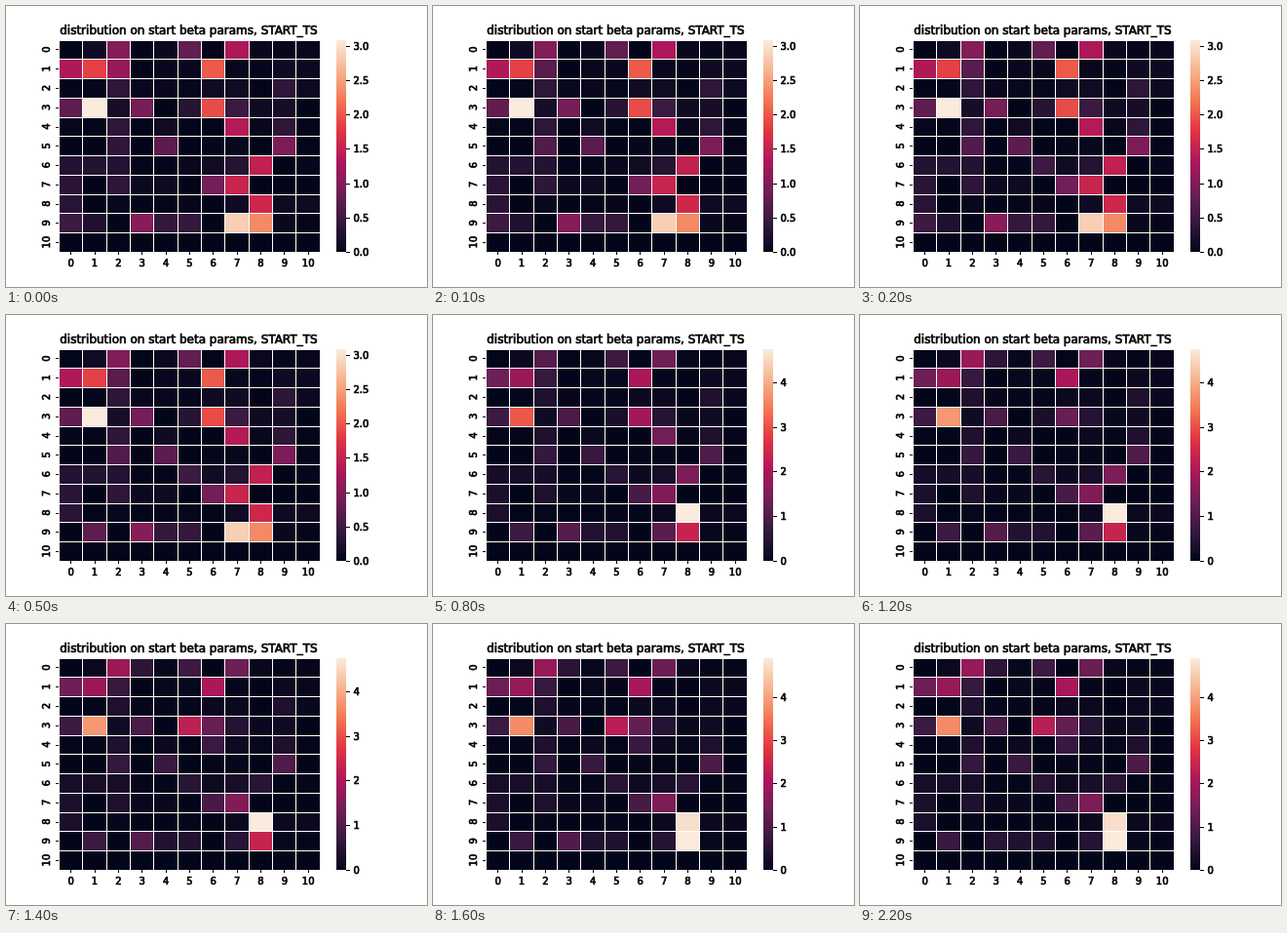
An HTML page for the animation above (3600 ms loop, 432 by 288 pixels).

```html
<!DOCTYPE html>
<html lang="en">
<head>
<meta charset="utf-8">
<title>Heatmap</title>
<style>
  html, body { margin: 0; width: 100%; height: 100%; overflow: hidden; background: #fff; }
  svg { display: block; width: 432px; height: 288px; }
  text { font: 10px "DejaVu Sans", sans-serif; fill: #000; stroke: #000; stroke-width: .7px; }
  .title { font-size: 12px; }
  .mid { text-anchor: middle; }
  rect { shape-rendering: crispEdges; }
</style>
</head>
<body>
<svg id="stage" viewBox="0 0 432 288"></svg>
<script>
const LOOP = 3600, N = 11;
const LEFT = 54, TOP = 34.56, WIDTH = 267.84, HEIGHT = 217.44;
const BOTTOM = TOP + HEIGHT;
const BAR = { x: 339, right: 349 };

// Evenly spaced key colours, low to high.
const ramp = ["#03051a", "#35193e", "#701f57", "#ad1759", "#e13342", "#f37651", "#f6b48f", "#faebdd"];

let seed = 7;
function random() {
  seed = (seed * 16807) % 2147483647;
  return seed / 2147483647;
}

// A faint haze, a few dim streaks, then the bright peaks.
const start = Array.from({ length: N }, (_, r) =>
  Array.from({ length: N }, () => r < N - 1 ? .15 * random() ** 3 : 0));

function streak(r, c, length, value, across) {
  for (let i = 0; i < length; i++) start[across ? r : r + i][across ? c + i : c] = value;
}
streak(2, 2, 6, .38);
streak(2, 9, 3, .38);
streak(6, 0, 4, .34);
streak(6, 0, 3, .28, true);
streak(9, 4, 2, .42, true);

const peaks = [
  [0, 2, 1.02], [0, 5, .78], [0, 7, 1.33],
  [1, 0, 1.35], [1, 1, 1.85], [1, 2, 1.15], [1, 6, 2.02],
  [3, 0, .76], [3, 1, 3.09], [3, 2, .18], [3, 3, .92], [3, 5, .32], [3, 6, 1.93], [3, 7, .48], [3, 9, .18],
  [4, 7, 1.38], [5, 4, .72], [5, 9, .98], [6, 7, .3], [6, 8, 1.48],
  [7, 6, .9], [7, 7, 1.54], [8, 8, 1.6],
  [9, 0, .5], [9, 1, .24], [9, 3, 1.04], [9, 7, 2.86], [9, 8, 2.35]
];

// Each step sets cells as [row, column, value] and may change the colour range.
const steps = [
  { at: 0, max: 3.09, cells: peaks },
  { at: 100, cells: [[1, 2, .7], [5, 2, .66]] },
  { at: 200, cells: [[6, 5, .5]] },
  { at: 500, cells: [[9, 0, 0], [9, 1, .74]] },
  { at: 800, max: 4.75, cells: [[8, 8, 4.75], [7, 8, 0], [9, 7, 1.1]] },
  { at: 900, cells: [[3, 1, 3.75], [3, 6, 1.25]] },
  { at: 1000, cells: [[4, 7, .12]] },
  { at: 1200, cells: [[0, 2, 1.85], [0, 3, .55]] },
  { at: 1400, cells: [[3, 5, 2.25], [4, 6, .72], [6, 8, .5], [9, 7, .5]] },
  { at: 1600, max: 4.91, cells: [[9, 8, 4.91], [2, 9, .12]] },
  { at: 2200, cells: [[9, 3, .52]] }
];

function add(parent, tag, attrs, text) {
  const el = document.createElementNS("http://www.w3.org/2000/svg", tag);
  for (const key in attrs) el.setAttribute(key, attrs[key]);
  if (text !== undefined) el.textContent = text;
  parent.appendChild(el);
  return el;
}

const box = (parent, x, y, width, height, fill = "#000") =>
  add(parent, "rect", { x, y, width, height, fill });

function color(u) {
  const p = Math.max(0, Math.min(1, u)) * (ramp.length - 1);
  const i = Math.min(ramp.length - 2, Math.floor(p));
  const mix = [1, 3, 5].map(k => {
    const [a, b] = [ramp[i], ramp[i + 1]].map(c => parseInt(c.slice(k, k + 2), 16));
    return Math.round(a + (b - a) * (p - i));
  });
  return `rgb(${mix})`;
}

const svg = document.getElementById("stage");
const edgeX = i => Math.round(LEFT + i * WIDTH / N);
const edgeY = i => Math.round(TOP + i * HEIGHT / N);

box(svg, 0, 0, 432, 288, "#fff");
add(svg, "text", { class: "title mid", x: LEFT + WIDTH / 2 - .5, y: 28.5 },
  "distribution on start beta params, START_TS");

const cells = start.map((row, r) => row.map((_, c) => {
  const x = edgeX(c) + 1, y = edgeY(r) + 1;
  return box(svg, x, y, edgeX(c + 1) - x, edgeY(r + 1) - y);
}));

for (let i = 0; i < N; i++) {
  const x = LEFT + (i + .5) * WIDTH / N, y = TOP + (i + .5) * HEIGHT / N;
  box(svg, Math.round(x), 252, 1, 3);
  box(svg, 51, Math.round(y), 3, 1);
  add(svg, "text", { class: "mid", x: x + .5, y: 267 }, i);
  add(svg, "text", { class: "mid", transform: `translate(45 ${y}) rotate(-90)` }, i);
}

const grad = add(add(svg, "defs", {}), "linearGradient", { id: "ramp", x1: 0, y1: 1, x2: 0, y2: 0 });
ramp.forEach((c, i) => add(grad, "stop", { offset: i / (ramp.length - 1), "stop-color": c }));
box(svg, BAR.x, 35, BAR.right - BAR.x, 217, "url(#ramp)");

function makeScale(max) {
  const g = add(svg, "g", {});
  const fine = max < 4;
  for (let v = 0; v <= max; v += fine ? .5 : 1) {
    const y = BOTTOM - v / max * HEIGHT;
    box(g, BAR.right, Math.round(y), 4, 1);
    add(g, "text", { x: 356.5, y: y + 3.9 }, v.toFixed(fine ? 1 : 0));
  }
  return { max, g };
}
const scales = steps.filter(s => s.max).map(s => makeScale(s.max));

function draw(t) {
  const values = start.map(row => row.slice());
  let max;
  for (const step of steps) {
    if (t < step.at) break;
    max = step.max || max;
    for (const [r, c, v] of step.cells) values[r][c] = v;
  }
  cells.forEach((row, r) => row.forEach((el, c) =>
    el.setAttribute("fill", color(values[r][c] / max))));
  for (const s of scales) s.g.setAttribute("display", s.max === max ? "inline" : "none");
}

const begin = performance.now();
function tick() {
  draw((performance.now() - begin) % LOOP);
  requestAnimationFrame(tick);
}
tick();
</script>
</body>
</html>
```
